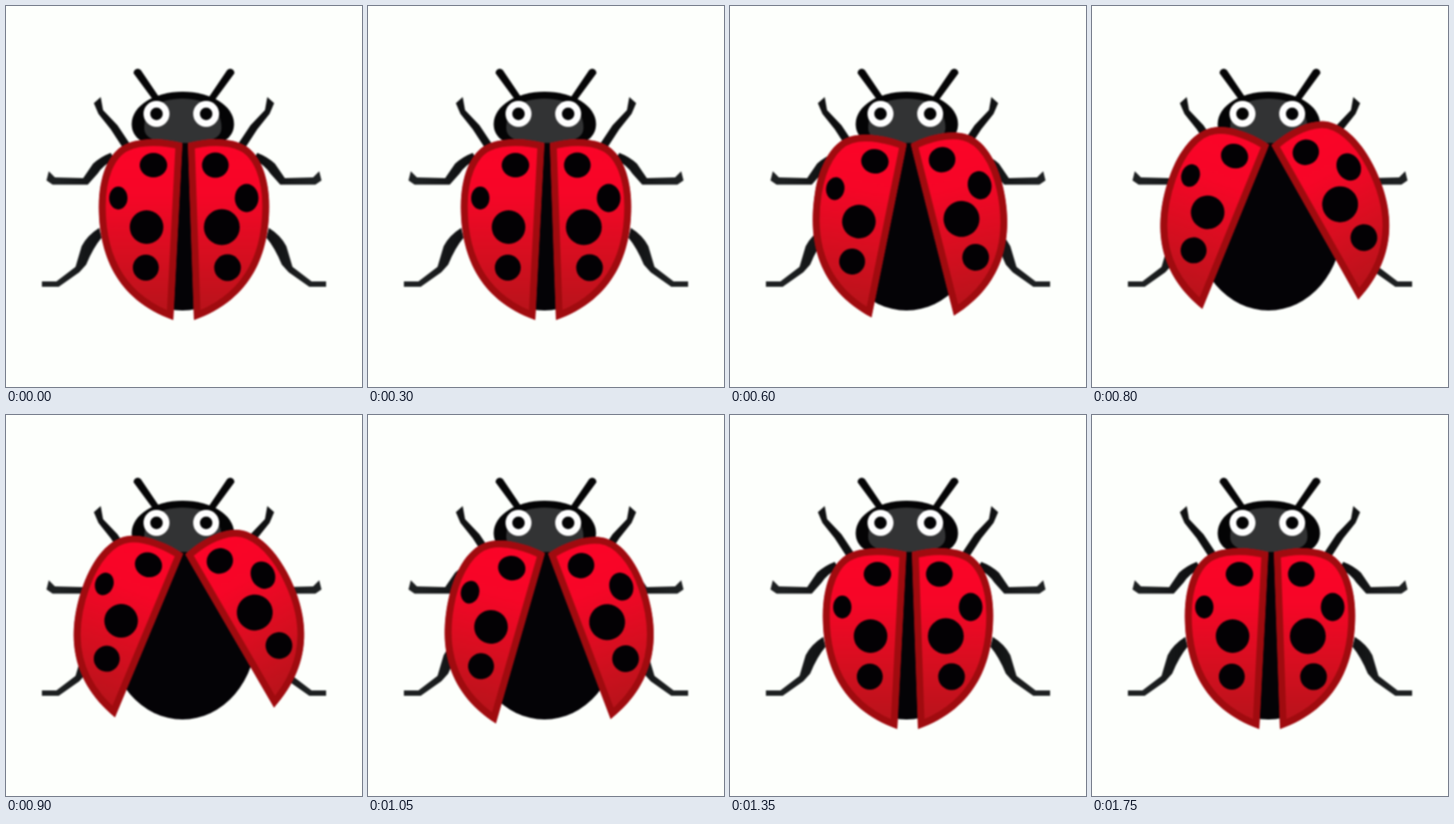
An HTML page that plays this animation: 466 by 498 pixels, repeating every 1900 ms.

```html
<!DOCTYPE html>
<html lang="en">
<head>
<meta charset="utf-8">
<title>Ladybug</title>
<style>
  html, body { margin: 0; width: 100%; height: 100%; overflow: hidden; background: #fdfffc; }
  svg { display: block; width: 100vw; height: 100vh; }
</style>
</head>
<body>
<svg viewBox="0 0 466 498" preserveAspectRatio="none">
  <defs>
    <filter id="soft" filterUnits="userSpaceOnUse" x="0" y="0" width="466" height="498" color-interpolation-filters="sRGB">
      <feGaussianBlur stdDeviation=".9"/>
    </filter>
    <linearGradient id="red" gradientUnits="userSpaceOnUse" x1="0" y1="175" x2="0" y2="410">
      <stop offset="0" stop-color="#fc0428"/>
      <stop offset=".3" stop-color="#f60627"/>
      <stop offset=".62" stop-color="#d80e20"/>
      <stop offset="1" stop-color="#b4141a"/>
    </linearGradient>
    <linearGradient id="limb" gradientUnits="userSpaceOnUse" x1="70" y1="0" x2="135" y2="0">
      <stop offset="0" stop-color="#1d2021"/>
      <stop offset="1" stop-color="#0d0e0f"/>
    </linearGradient>
    <path id="leftShell" d="M231 179C208 173 177 171 156 181C133 192 121.500 225 121.500 262C121.500 322 142 383 219 410.500Z"/>
    <path id="rightShell" d="M238 179C261 173 289 171 310 181C333 192 344.500 225 344.500 262C344.500 322 323 383 246 410.500Z"/>
    <clipPath id="leftClip"><use href="#leftShell"/></clipPath>
    <clipPath id="rightClip"><use href="#rightShell"/></clipPath>
    <g id="side">
      <g fill="url(#limb)">
        <path d="M124 119L127 136L146 156L162 180L152 184L137 161L121 141L115 127Z"/>
        <path d="M56 216L64 224L101 225L114 206Q124 197 137 192L142 200Q126 209 120 219L107 233.500L61 233.500L53 228Z"/>
        <path d="M47 360L66 360L91 341L99 314Q106 300 122 290L125 303Q114 316 105 338L96 348L69 367L47 367Z"/>
      </g>
      <path d="M167 88Q167 83 172 82Q176 82 178 86L201 120L192 122Z" fill="#050506"/>
    </g>
  </defs>
  <rect width="466" height="498" fill="#fdfffc"/>
  <g filter="url(#soft)">
    <use href="#side"/>
    <use href="#side" transform="translate(466 0) scale(-1 1)"/>
    <ellipse cx="231" cy="285" rx="97" ry="113" fill="#040306"/>
    <path fill="#040405" d="M164.500 154C165 130 195 112 231 112C268 112 298 130 298.500 154C298.500 169 288 179 270 181L192 181C175 179 164.500 169 164.500 154Z"/>
    <path fill="#323334" d="M181 159C181 135 200 121 231 121C262 121 282 135 282 159C282 173 268 179 231 179C194 179 181 173 181 159Z"/>
    <g id="eyes"></g>
    <g id="left"></g>
    <g id="right"></g>
  </g>
</svg>
<script>
const $ = id => document.getElementById(id);
const oval = (x, y, rx, ry, fill) =>
  `<ellipse cx="${x}" cy="${y}" rx="${rx}" ry="${ry}" fill="${fill}"/>`;

const wings = {
  left: {
    pivot: "224.8 183.2", turn: 0.7,
    spots: [[193, 208, 18, 16], [147, 251, 12, 15], [184, 289, 22, 22], [183, 342, 17, 17]]
  },
  right: {
    pivot: "242.6 187.6", turn: -1,
    spots: [[274, 208, 17.5, 16.5], [315, 251, 15.5, 18.5], [282.5, 289, 23.5, 23.5], [290, 342, 17.5, 17.5]]
  }
};

$("eyes").innerHTML = [197, 262].map(x =>
  oval(x, 141, 17, 17, "#fff") + oval(x, 141, 8.2, 8.2, "#040405")).join("");

for (const [id, w] of Object.entries(wings)) {
  $(id).innerHTML =
    `<use href="#${id}Shell" fill="url(#red)" stroke="#a00b0f" stroke-width="18" clip-path="url(#${id}Clip)"/>` +
    w.spots.map(s => oval(...s, "#030104")).join("");
}

const LOOP = 1900, STEP = 50, OPEN = 440, PEAK = 850, SHUT = 1350, SPREAD = 31.3;

function spread(t) {
  const k = t < PEAK ? (t - OPEN) / (PEAK - OPEN) : (SHUT - t) / (SHUT - PEAK);
  return SPREAD * Math.max(0, k);
}

function draw(ms) {
  const t = Math.floor((ms % LOOP) / STEP) * STEP;
  const angle = spread(t);
  for (const [id, w] of Object.entries(wings)) {
    $(id).setAttribute("transform", `rotate(${angle * w.turn} ${w.pivot})`);
  }
}

const start = performance.now();
function tick() {
  draw(performance.now() - start);
  requestAnimationFrame(tick);
}
tick();
</script>
</body>
</html>
```
